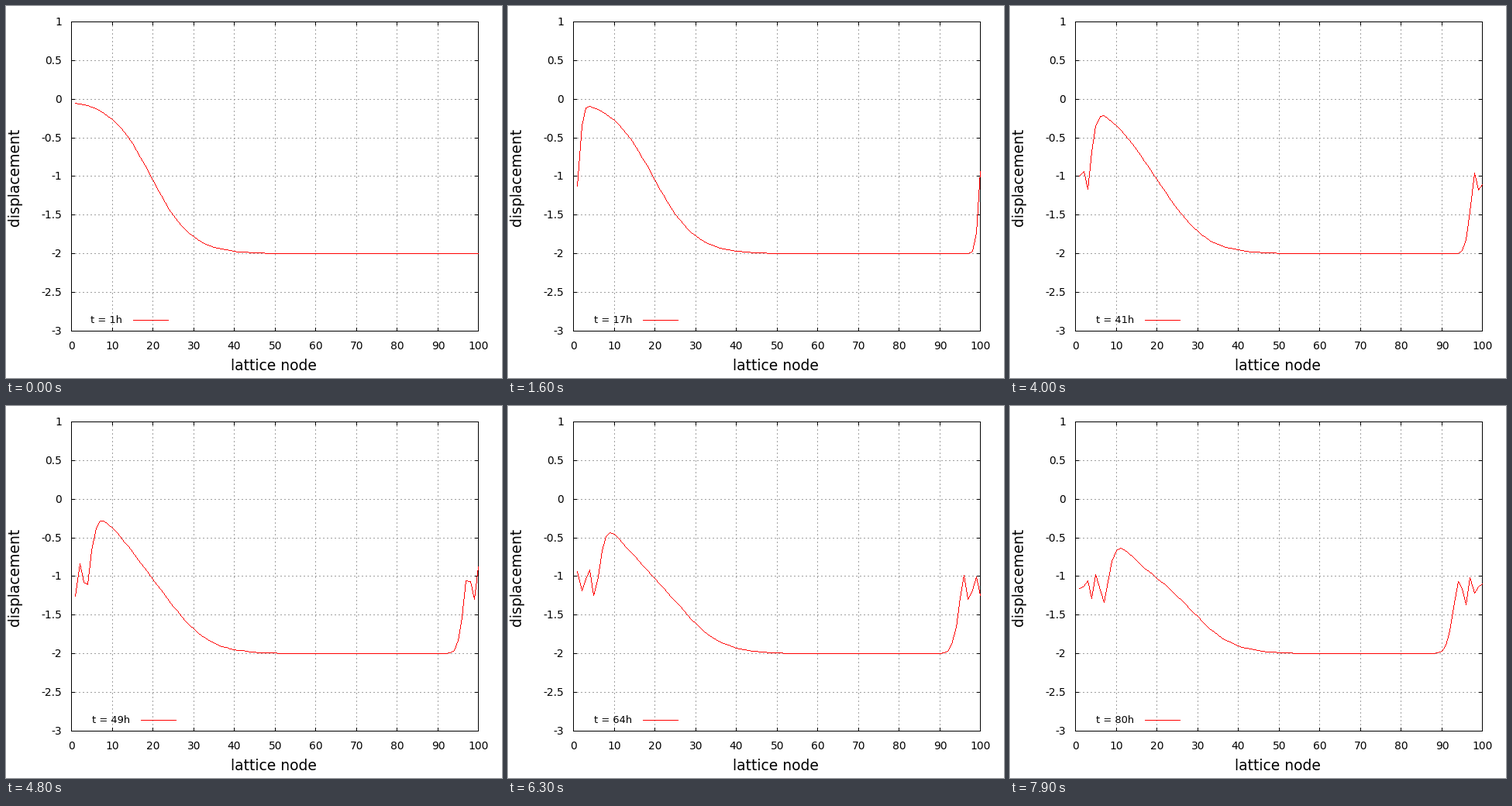
These frames come from a looping animation (640 px wide and 480 px high, 8 s). A matplotlib script:

```python
import numpy as np
import matplotlib.pyplot as plt
from matplotlib.animation import FuncAnimation

W, H, DPI = 640, 480, 100
LEFT, RIGHT, TOP, BOTTOM = 84, 609, 20, 419
NODES, FRAMES, STEP, SUB = 100, 80, 0.1205, 6
PX = 72 / DPI  # one pixel in points
TICK = 4
RED = (255, 0, 0, 255)

plt.rcParams["font.family"] = "DejaVu Sans"


def px(node):
    return np.floor(LEFT + (RIGHT - LEFT) * node / NODES + 0.5).astype(int)


def py(value):
    return BOTTOM - np.floor((BOTTOM - TOP) * (value + 3) / 4 + 0.5).astype(int)


def toda(u):
    """Acceleration in a periodic chain with exponential springs."""
    e = np.exp(u - np.roll(u, -1))
    return np.roll(e, 1) - e


def simulate():
    u = -1 - np.tanh((nodes - 19.5) / 10)
    v = np.zeros(NODES)
    dt = STEP / SUB
    states = [u.copy()]
    for _ in range(FRAMES - 1):
        for _ in range(SUB):
            v += toda(u) * dt / 2
            u += v * dt
            v += toda(u) * dt / 2
        states.append(u.copy())
    return states


def trace(img, xs, ys):
    """Draw a one pixel wide polyline without smoothing."""
    for x0, y0, x1, y1 in zip(xs, ys, xs[1:], ys[1:]):
        n = max(abs(x1 - x0), abs(y1 - y0)) + 1
        cols = np.floor(np.linspace(x0, x1, n) + 0.5).astype(int)
        rows = np.floor(np.linspace(y0, y1, n) + 0.5).astype(int)
        img[rows, cols] = RED


nodes = np.arange(1, NODES + 1)
states = simulate()

fig = plt.figure(figsize=(W / DPI, H / DPI), dpi=DPI, facecolor="white")
ax = fig.add_axes([0, 0, 1, 1])
ax.axis("off")


def line(xs, ys, color="black", **kw):
    ax.plot(xs, ys, color=color, lw=PX, antialiased=False, snap=False,
            solid_capstyle="projecting", **kw)


def label(x, y, text, size=10, **kw):
    return ax.text(x, y, text, fontsize=size, va="baseline", **kw)


grid = dict(color="#a0a0a0", linestyle=(0, (2, 3)), dash_capstyle="butt", zorder=1)
l, r, t, b = LEFT + 0.5, RIGHT + 0.5, TOP + 0.5, BOTTOM + 0.5

for n in range(0, 101, 10):
    x = px(n) + 0.5
    if 0 < n < 100:
        line([x, x], [t, b], **grid)
    line([x, x], [b, b - TICK], zorder=2)
    line([x, x], [t, t + TICK], zorder=2)
    label(x, 443, str(n), ha="center")

for k in range(-6, 3):
    y = py(k / 2) + 0.5
    if -6 < k < 2:
        line([l, r], [y, y], **grid)
    line([l, l + TICK], [y, y], zorder=2)
    line([r, r - TICK], [y, y], zorder=2)
    label(72, y + 4.5, f"{k / 2:g}", ha="right")

line([l, r, r, l, l], [t, t, b, b, t], zorder=2)
label(345.5, 470, "lattice node", 13.5, ha="center")
label(17, 221, "displacement", 13.5, ha="center",
      rotation=90, rotation_mode="anchor")

key = label(150, 409, "", 9.4, ha="right")
canvas = ax.imshow(np.zeros((H, W, 4), np.uint8), extent=(0, W, H, 0),
                   interpolation="nearest", aspect="auto", zorder=3)
ax.set_xlim(0, W)
ax.set_ylim(H, 0)


def update(i):
    img = np.zeros((H, W, 4), np.uint8)
    trace(img, px(nodes), py(states[i]))
    end = 150 if i < 9 else 160
    trace(img, [end + 14, end + 59], [405, 405])
    canvas.set_data(img)
    key.set_x(end)
    key.set_text(f"t = {i + 1}h")
    return canvas, key


anim = FuncAnimation(fig, update, frames=FRAMES, interval=100,
                     repeat=True, repeat_delay=0, blit=False)
plt.show()
```
